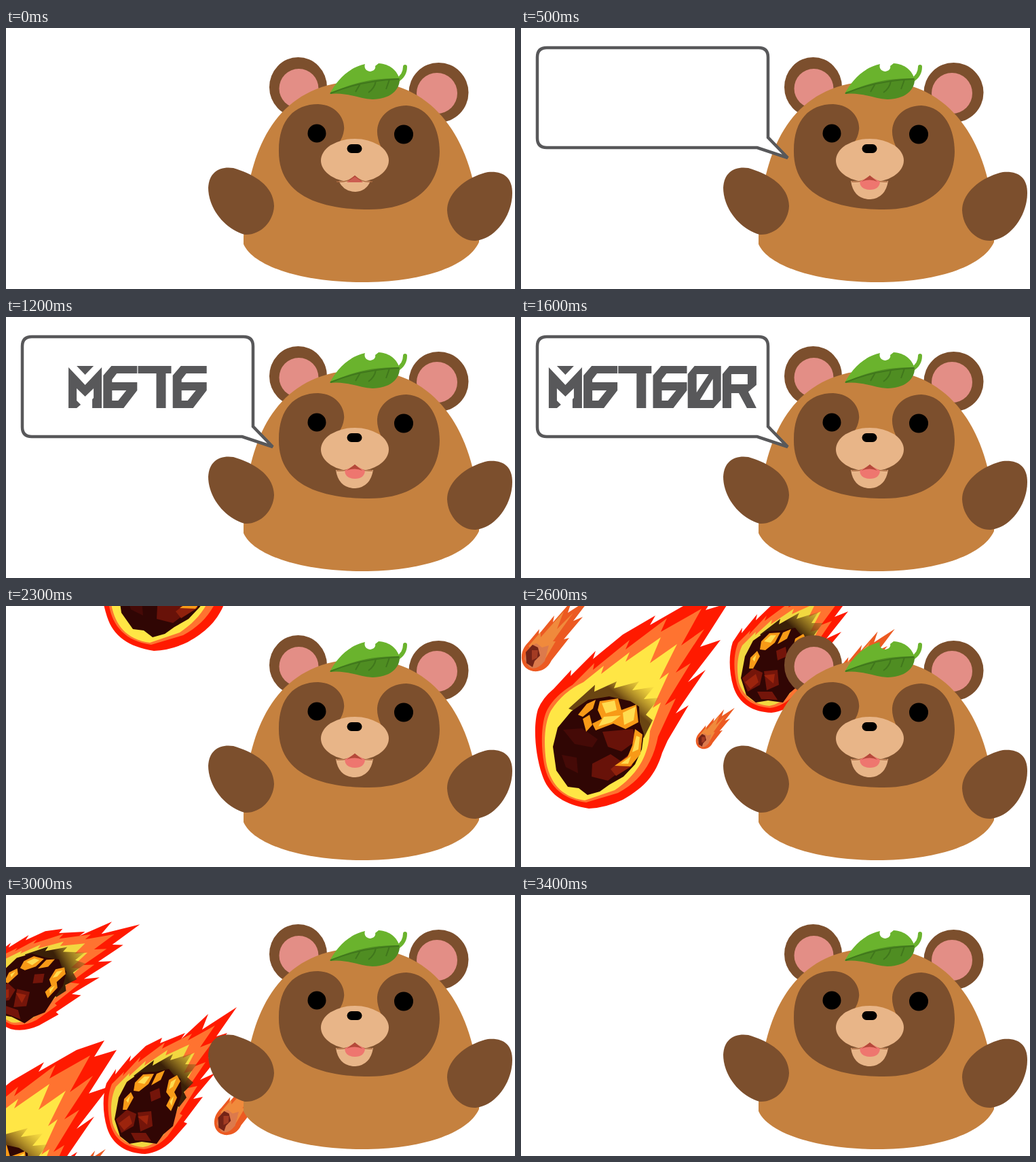
These frames come from a looping animation (750x384 px, 3.6 s). An HTML page:

```html
<!DOCTYPE html>
<html lang="en">
<head>
<meta charset="utf-8">
<title>Meteor</title>
<style>
html, body { margin: 0; width: 100%; height: 100%; overflow: hidden; background: #fff; }
svg { display: block; width: 750px; height: 384px; }
</style>
</head>
<body>
<svg viewBox="0 0 750 384">
  <defs>
    <linearGradient id="smear" gradientUnits="userSpaceOnUse" x1="140" y1="165" x2="190" y2="108">
      <stop offset=".35" stop-color="#6a4512"/>
      <stop offset="1" stop-color="#d0a528" stop-opacity="0"/>
    </linearGradient>
    <linearGradient id="darkSmear" gradientUnits="userSpaceOnUse" x1="225" y1="290" x2="288" y2="222">
      <stop offset=".35" stop-color="#3a2008"/>
      <stop offset="1" stop-color="#b98a20" stop-opacity="0"/>
    </linearGradient>

    <!-- Large fireball, rock centred on the origin -->
    <g id="fireball"><g transform="translate(-113 -207)">
      <path fill="#ff1a00" d="M100 298C62 292 40 276 31 248C20 215 18 175 25 152Q32 135 48 122L74 94L73 103L110 66L106 78L150 42L198 14L190 28L246 -4L287 -18L272 6L305 -4L264 60L294 50L246 112L272 94L228 158L247 146L216 198L208 216C198 250 180 268 150 285Q125 297 100 298Z"/>
      <path fill="#ff7330" d="M96 289C58 284 39 261 34 232C28 200 31 166 39 152Q50 132 76 116L108 84L106 94L160 50L154 64L215 18L206 38L266 4L236 58L270 34L228 98L250 84L212 146L228 136L202 192C194 232 176 257 143 275Z"/>
      <path fill="#ffe645" d="M94 286C57 281 42 257 37 229C33 198 35 171 44 154Q62 126 92 112L122 88L118 100L160 68L154 82L206 46L190 84L230 56L204 108L218 98L194 150L206 142L190 184C188 220 172 248 138 271Z"/>
      <path fill="url(#smear)" d="M70 151L109 116L108 126L141 111L137 121L174 111L164 124L196 119L181 137L204 135L184 160L194 168L181 194Z"/>
      <path fill="#300604" d="M47 207L54 179L74 155L99 138L130 133L161 140L174 148L175 171L181 188L178 211L168 233L151 251L130 263L116 273L98 278L85 268L69 266L52 242Z"/>
      <path fill="#450a07" d="M62 182L90 180L113 196L105 208L79 203ZM60 219L82 223L84 246L66 237Z"/>
      <path fill="#681209" d="M120 185L165 181L170 198L148 214L128 207ZM105 232L132 218L157 235L128 257L104 251Z"/>
      <path fill="#8f210c" d="M132 240L166 213L164 235L140 250Z"/>
      <path fill="#f89a17" d="M84 160L97 144L110 138L106 151L91 163ZM91 166L101 160L105 175L96 185ZM116 140L143 136L148 153L170 145L173 171L154 181L136 173L110 183L105 173L119 166L113 153ZM168 181L179 189L176 218L161 236L138 235L157 222L164 205Z"/>
      <path fill="#ffdc50" d="M119 143L138 139L141 153L125 158ZM122 163L147 161L134 171L114 177ZM150 157L169 148L166 168L152 175ZM170 191L175 193L173 211L164 215ZM147 232L162 221L158 232Z"/>
    </g></g>

    <!-- Darker, ragged meteorite, rock centred on the origin -->
    <g id="meteorite"><g transform="translate(-210 -313)">
      <path fill="#ff1a00" d="M205 381C178 380 157 368 149 343C142 320 142 295 148 277L162 256L161 264L184 236L182 245L206 222L230 210L227 218L264 203L258 212L298 175L289 198L340 165L310 208L326 203L298 240L318 232L286 272L308 262L276 300L290 297L262 334L267 336L244 362Q226 379 205 381Z"/>
      <path fill="#ff7330" d="M203 374C178 372 160 360 154 338C148 315 150 292 156 278L174 260L172 266L198 238L195 246L234 217L230 226L274 204L268 214L308 192L286 224L304 217L278 252L294 246L268 284L282 281L256 322L260 324L238 355Q222 372 203 374Z"/>
      <path fill="#f2d840" d="M202 371C179 369 163 356 157 336C153 315 155 296 162 282L182 262L181 267L206 244L204 251L238 228L235 236L270 220L260 240L278 232L262 262L274 259L258 288L264 288L250 322L233 352Q219 368 202 371Z"/>
      <path fill="url(#darkSmear)" d="M188 266L218 243L216 251L246 234L242 243L274 233L264 249L281 249L267 268L276 276L262 290L266 298L255 312Z"/>
      <path fill="#310604" d="M160 330L166 298L178 275L198 261L220 260L240 256L248 266L257 270L259 292L252 316L246 340L232 352L222 366L200 363L182 366L168 355Z"/>
      <path fill="#74150a" d="M162 330L178 316L192 322L188 340L170 350ZM194 320L214 318L216 340L198 348ZM184 350L206 350L214 362L190 361ZM212 290L226 284L228 298L214 304Z"/>
      <path fill="#9c240d" d="M166 336L182 324L186 336L174 346ZM194 326L210 324L208 338Z"/>
      <path fill="#f89a17" d="M190 276L202 264L218 263L210 278L196 289L188 288ZM222 263L234 258L228 272L214 280ZM174 300L184 290L188 298L178 316L172 316ZM240 272L252 265L257 274L248 290L252 298L243 318L236 310L242 298L236 290Z"/>
      <path fill="#ffdc50" d="M194 276L204 267L212 267L204 278ZM243 275L251 270L246 282L240 286ZM241 304L247 296L244 310ZM177 302L183 295L180 306Z"/>
    </g></g>

    <!-- Small ember, rock on the origin -->
    <g id="ember">
      <path fill="#ec5a22" d="M-20 2C-21-10-15-18-9-24L6-42L5-34L28-62L26-52L54-84L48-66L82-88L56-54L70-60L42-27L50-29L24 4C18 17 7 21-3 20C-13 18-19 12-20 2Z"/>
      <path fill="#f08a3c" d="M-10-17L8-38L8-30L42-68L32-42L56-66L26-24L30-24L14 3Z"/>
      <path fill="#dc7a4c" d="M-16 2Q-12-18 2-21L10-15L20-18L14 5Q2 20-9 14Z"/>
      <path fill="#742417" d="M-14-8L-4-19L4-15L7-3L-1 5L-4 14L-13 8Z"/>
      <path fill="#a33b23" d="M-5-11L4-11L3 0L-5 4Z"/>
    </g>
  </defs>

  <g id="meteors"></g>

  <g id="bear">
    <g fill="#7c4f2d"><ellipse cx="430.500" cy="87" rx="42.500" ry="44"/><circle cx="637.500" cy="95" r="44"/></g>
    <g fill="#e38e86"><circle cx="431.500" cy="89" r="29"/><circle cx="635" cy="96" r="30"/></g>
    <path fill="#c5813f" d="M350 308C352 200 385 78 525 78C645 78 700 190 697 315C680 352 610 374 525 374C440 374 365 352 350 318Z"/>
    <g fill="#7c4f2d">
      <path d="M298 235C299 212 315 203 335 206C362 214 394 230 395 262C394 285 375 305 352 304C322 296 298 265 298 235Z"/>
      <path d="M746 243C746 220 733 210 710 212C682 218 650 240 650 268C651 295 672 314 692 313C722 310 746 275 746 243Z"/>
      <path d="M402 180C402 135 425 112 460 112C488 113 500 135 498 150C496 165 488 175 470 190H560C555 180 546 165 547 150C549 128 568 114 590 114C625 116 639 150 639 182C638 235 600 267 535 267C450 267 401 239 402 180Z"/>
    </g>
    <circle cx="458" cy="155" r="13.500"/><circle cx="586" cy="156.500" r="14"/>
    <path id="mouthOpen" fill="#e8b588" d="M486 225Q490 252 515 252Q537 250 541 225Z"/>
    <path id="mouthShut" fill="#e8b588" d="M490 225Q498 241 515 241Q531 240 537 225Z"/>
    <ellipse cx="514" cy="195" rx="50" ry="32" fill="#e8b588"/>
    <path fill="none" stroke="#a8683f" stroke-width="1.500" d="M487 226Q503 228 514 218Q525 228 540 226"/>
    <path id="tongue" fill="#ee766f" d="M499 226L514 218L529 226Q528 238 514 238Q500 238 499 226Z"/>
    <path fill="#b5493a" d="M502 226L514 217L525 226Q514 221 502 226Z"/>
    <path id="lip" fill="#cc5d51" d="M502 227L514 219L526 227Z"/>
    <rect x="502.500" y="171" width="22" height="13" rx="6.500"/>
    <path fill="none" stroke="#6ab32d" stroke-width="6" stroke-linecap="round" d="M576 77Q588 70 588 57"/>
    <path fill="#6ab32d" d="M477 97C487 77 505 58 529 53C527 59 531 64 537 64C542 63 545 60 544 56L549 52C566 53 577 63 580 76Z"/>
    <path fill="#4f8d22" d="M477 97C505 82 540 73 580 74C581 91 566 105 540 105C520 104 502 94 477 97Z"/>
    <path fill="none" stroke="#40771c" stroke-width="2" d="M478 96Q525 77 579 75M522 82L515 94M545 78Q543 89 534 95M565 76L560 90"/>
  </g>

  <g id="bubble">
    <path fill="#fff" stroke="#58585a" stroke-width="4.500" d="M38 29H350Q364 29 364 43V161L393 191L348 176H38Q24 176 24 162V43Q24 29 38 29Z"/>
    <g id="word" fill="#58585a" fill-rule="evenodd" role="img" aria-label="METEOR"></g>
  </g>
</svg>

<script>
const LOOP = 3600, ADVANCE = 51.2;
const $ = id => document.getElementById(id);
const add = (parent, tag, attributes) => {
  const node = document.createElementNS("http://www.w3.org/2000/svg", tag);
  for (const key in attributes) node.setAttribute(key, attributes[key]);
  return parent.appendChild(node);
};
const show = (node, visible) => node.setAttribute("visibility", visible ? "visible" : "hidden");

// Angular lettering, one glyph per 50 x 62 cell
const glyphs = {
  M: "M0 2L24.500 28L49 2V62H35V49L37 47V33L24.500 45L12 33V51L18 57L12 62H0ZM12 0H37L24.500 13Z",
  E: "M12 0H50V11H20L13 20V24H50V36L30 62H0V14ZM13 36H34L22 51H13Z",
  T: "M0 0H49V11H41V62H27V11H0Z",
  O: "M10 0H49V50L38 62H0V12ZM13 12V39L31 12ZM37 19L18 50H37Z",
  R: "M10 0H50V28L38 38L50 62H36L24 40H13V62H0V12ZM13 12V27H37V12Z"
};
const letters = [..."METEOR"].map((letter, i) =>
  add($("word"), "path", { d: glyphs[letter], transform: `translate(${i * ADVANCE})` }));

// x and y hold the place at step 2; dx and dy are the travel per step
const meteors = [
  { shape: "ember", x: 21, y: 76, dx: -60, dy: 95, scale: 1, turn: 0 },
  { shape: "ember", x: 269, y: 199, dx: -84, dy: 112, scale: .56, turn: 0 },
  { shape: "ember", x: 477, y: 113, dx: -76, dy: 111, scale: .9, turn: 0 },
  { shape: "meteorite", x: 189, y: -93, dx: -78, dy: 115, scale: .96, turn: 19 },
  { shape: "meteorite", x: 374, y: 89, dx: -82, dy: 112, scale: 1, turn: 0 },
  { shape: "fireball", x: 113, y: 207, dx: -65, dy: 116, scale: 1, turn: 0, bend: -3 }
];
for (const m of meteors) m.node = add($("meteors"), "use", { href: "#" + m.shape });

const letterTimes = [600, 800, 1000, 1200, 1400, 1600];
const fallTimes = [2300, 2400, 2600, 2800, 3000, 3200];
const passed = (times, t) => times.filter(time => t >= time).length;

function draw(t) {
  const count = passed(letterTimes, t);
  const talking = t >= 500 && t < 1800;
  show($("bubble"), talking);
  letters.forEach((node, i) => show(node, talking && i < count));
  $("word").setAttribute("transform", `translate(${194.5 - count * ADVANCE / 2} 72)`);

  const open = talking ? count % 2 === 0 : t >= 2300;
  show($("mouthOpen"), open);
  show($("tongue"), open);
  show($("mouthShut"), !open);
  show($("lip"), !open);

  const step = passed(fallTimes, t) - 1;
  show($("meteors"), step >= 0 && t < 3400);
  for (const m of meteors) {
    const u = step - 2;
    const x = m.x + m.dx * u + (m.bend || 0) * u * u;
    const y = m.y + m.dy * u;
    m.node.setAttribute("transform", `translate(${x} ${y}) rotate(${m.turn}) scale(${m.scale})`);
  }
}

const start = performance.now();
function tick() {
  draw((performance.now() - start) % LOOP);
  requestAnimationFrame(tick);
}
tick();
</script>
</body>
</html>
```
